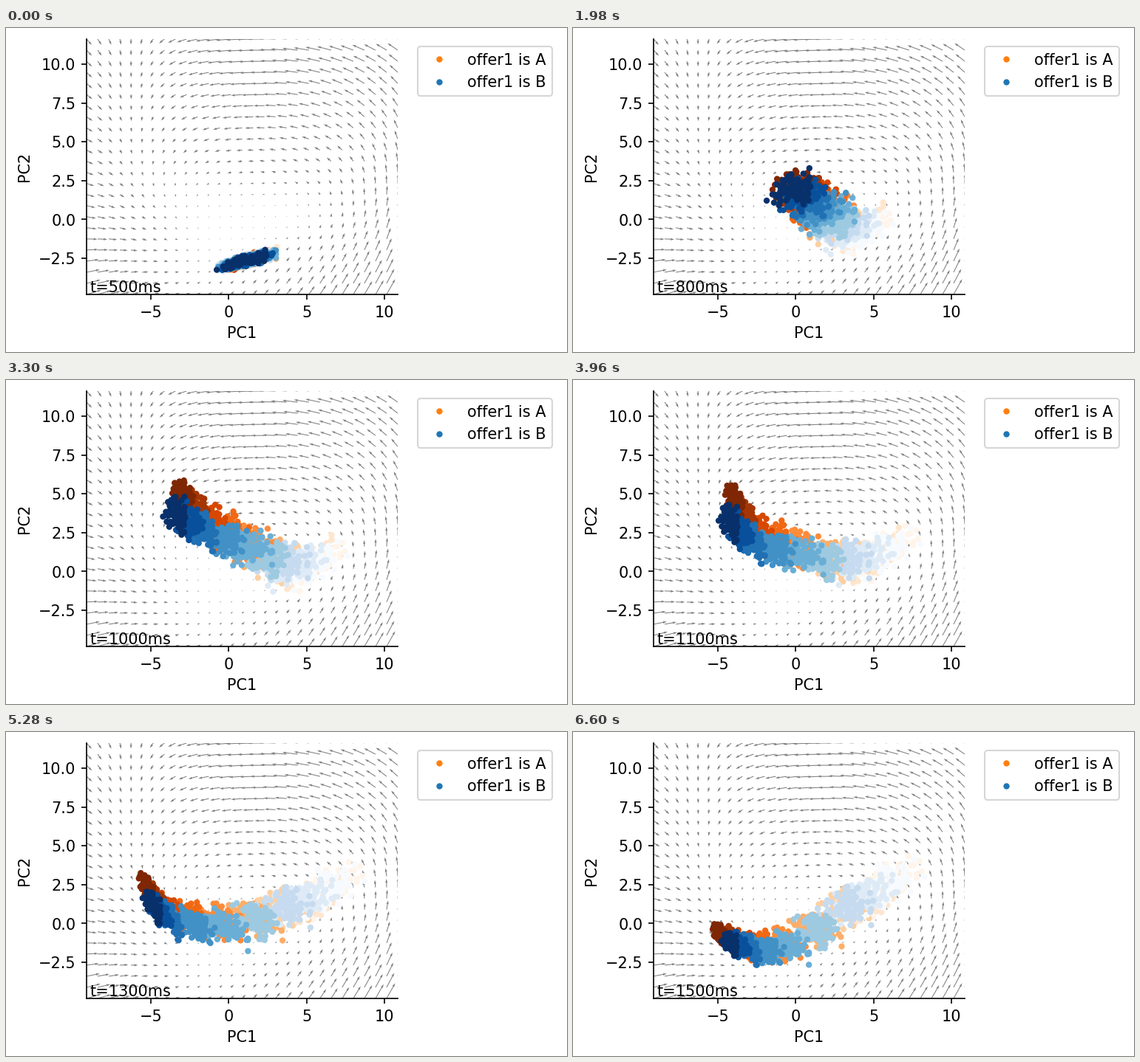
Write a matplotlib script that moves like this. It is 759 by 439 pixels and loops after 8000 ms.

```python
import numpy as np
import matplotlib.pyplot as plt
from matplotlib.animation import FuncAnimation
from matplotlib.lines import Line2D

W, H, DPI = 759, 439, 150
LOOP, INTERVAL, HOLD, STEPS = 8000, 40, 330, 20
XLIM, YLIM = (-9.13, 10.85), (-4.82, 11.61)
PER_LEVEL = 100

plt.rcParams["font.family"] = "DejaVu Sans"


def spline(x, knots, values):
    """Smooth curve through values (along axis 0) at the knots."""
    x, knots = np.asarray(x, float), np.asarray(knots, float)
    values = np.asarray(values, float)
    slope = np.gradient(values, knots, axis=0)
    i = np.clip(np.searchsorted(knots, x, "right") - 1, 0, len(knots) - 2)
    shape = (-1,) + (1,) * (values.ndim - 1)
    h = (knots[i + 1] - knots[i]).reshape(shape)
    t = (x - knots[i]).reshape(shape) / h
    return ((1 + 2 * t) * (1 - t) ** 2 * values[i]
            + t * (1 - t) ** 2 * h * slope[i]
            + t ** 2 * (3 - 2 * t) * values[i + 1]
            + t ** 2 * (t - 1) * h * slope[i + 1])


# Flow field: pixel displacements on a coarse grid, bottom row first.
FIELD_X = [-9.13, -5.29, -1.49, 2.31, 6.58, 10.85]
FIELD_Y = [-4.82, -0.02, 3.78, 7.57, 11.61]
FLOW_U = [[20, 9, 4, 6, 9, 12],
          [13, 5, 0.5, 0, 1, 4],
          [9, 0, -5, -7, -6, -2],
          [8, -2, -11, -15, -13, -8],
          [7, -3, -17, -23, -20, -15]]
FLOW_V = [[6, 2, 3, 7, 14, 22],
          [-2, -3, -1.5, 0.3, 5, 15],
          [-4, -5, -3, 1, 5, 12],
          [-6, -6, -3, 0, 5, 11],
          [-8, -7, -3, 0, 5, 9]]

# Cloud centres at key steps, from the lowest value to the highest.
KEYS = [0, 4, 8, 10, 14, 16, 20]
VALUES = [0, 0.25, 0.5, 0.75, 1]
CENTRES = [
    [(1.2, -2.6), (1.2, -2.6), (1.15, -2.6), (1.15, -2.65), (1.1, -2.65)],
    [(3.64, -1.45), (2.88, -1.07), (2.21, -0.59), (1.5, -0.21), (0.88, 0.17)],
    [(4.92, -0.12), (3.35, 0.07), (1.6, 1.02), (-0.07, 2.26), (-1.73, 3.3)],
    [(5.39, 0.45), (3.64, 0.55), (1.26, 1.5), (-1.59, 2.68), (-3.39, 3.68)],
    [(6.0, 1.88), (3.02, 0.78), (-0.54, 0.36), (-3.48, 0.93), (-4.62, 2.26)],
    [(6.34, 2.16), (3.73, 1.02), (-0.3, -0.21), (-3.77, 0.36), (-4.86, 1.16)],
    [(5.87, 2.45), (3.35, 1.02), (-0.64, -1.5), (-3.01, -1.54), (-4.2, -1.26)],
]
# How far the highest A cloud sits from the highest B cloud.
A_SHIFT = [(0, 0), (-0.3, 0.1), (0.3, 0.65), (0.4, 1.2),
           (-0.05, 1.4), (-0.4, 1.2), (-0.7, 0.65)]
# Width, height and slope of the lowest and highest clouds.
SPREAD = [
    [(0.72, 0.15, 0.25), (0.72, 0.15, 0.25)],
    [(0.65, 0.38, 0.4), (0.72, 0.36, 0.45)],
    [(0.8, 0.46, 0.4), (0.5, 0.5, -0.1)],
    [(0.85, 0.52, 0.4), (0.32, 0.5, -0.3)],
    [(0.9, 0.58, 0.4), (0.28, 0.42, -0.9)],
    [(0.92, 0.58, 0.4), (0.26, 0.34, -1.1)],
    [(0.92, 0.62, 0.4), (0.22, 0.28, -0.6)],
]


def build_clouds():
    """Positions (step, point, xy) and colours, A below B, low below high."""
    rng = np.random.default_rng(4)
    steps = np.arange(STEPS + 1)
    levels = np.linspace(0, 1, 9)
    centres = spline(steps, KEYS, CENTRES)
    centres = spline(levels, VALUES, np.moveaxis(centres, 1, 0))
    shift = spline(steps, KEYS, A_SHIFT)
    spread = spline(steps, KEYS, SPREAD)
    paths, colours = [], []
    for cmap, offset in ((plt.cm.Oranges, shift), (plt.cm.Blues, 0 * shift)):
        for level, centre in zip(levels, centres):
            mid = centre + offset * level ** 2
            shape = spread[:, 0] * (1 - level) + spread[:, 1] * level
            sx, sy, slope = shape.T[:, :, None]
            a, b = np.clip(rng.normal(size=(2, PER_LEVEL)), -2.6, 2.6)
            dx = sx * a
            dy = slope * dx + sy * b
            paths.append(mid[:, None] + np.stack([dx, dy], axis=-1))
            colours += [cmap(level)] * PER_LEVEL
    return np.concatenate(paths, axis=1), colours


# The small margin keeps the pixel size from rounding down.
fig = plt.figure(figsize=((W + 0.01) / DPI, (H + 0.01) / DPI), dpi=DPI,
                 facecolor="white")
ax = fig.add_axes([109 / W, 1 - 361 / H, 421 / W, 346 / H])
ax.set(xlim=XLIM, ylim=YLIM, xlabel="PC1", ylabel="PC2",
       xticks=[-5, 0, 5, 10], yticks=np.arange(-2.5, 10.1, 2.5))
ax.spines[["top", "right"]].set_visible(False)

gx, gy = np.linspace(*XLIM, 29), np.linspace(*YLIM, 24)
u, v = (spline(gx, FIELD_X, spline(gy, FIELD_Y, f).T).T
        for f in (FLOW_U, FLOW_V))
ax.quiver(gx, gy, u, v, color="gray", width=0.0025,
          scale=1, scale_units="dots", zorder=1)

paths, colours = build_clouds()
dots = ax.scatter(*paths[0].T, s=16, c=colours, linewidths=0, zorder=2)
label = ax.text(0.01, 0.01, "", transform=ax.transAxes, zorder=3)

handles = [Line2D([], [], ls="", marker=".", color=c, label=f"offer1 is {n}")
           for c, n in (("C1", "A"), ("C0", "B"))]
ax.legend(handles=handles, loc="upper left", bbox_to_anchor=(1.04, 1))


def update(i):
    step = min((i * INTERVAL + INTERVAL // 2) // HOLD, STEPS)
    dots.set_offsets(paths[step])
    label.set_text(f"t={500 + 50 * step}ms")
    return dots, label


anim = FuncAnimation(fig, update, frames=LOOP // INTERVAL,
                     interval=INTERVAL, repeat=True)
plt.show()
```
